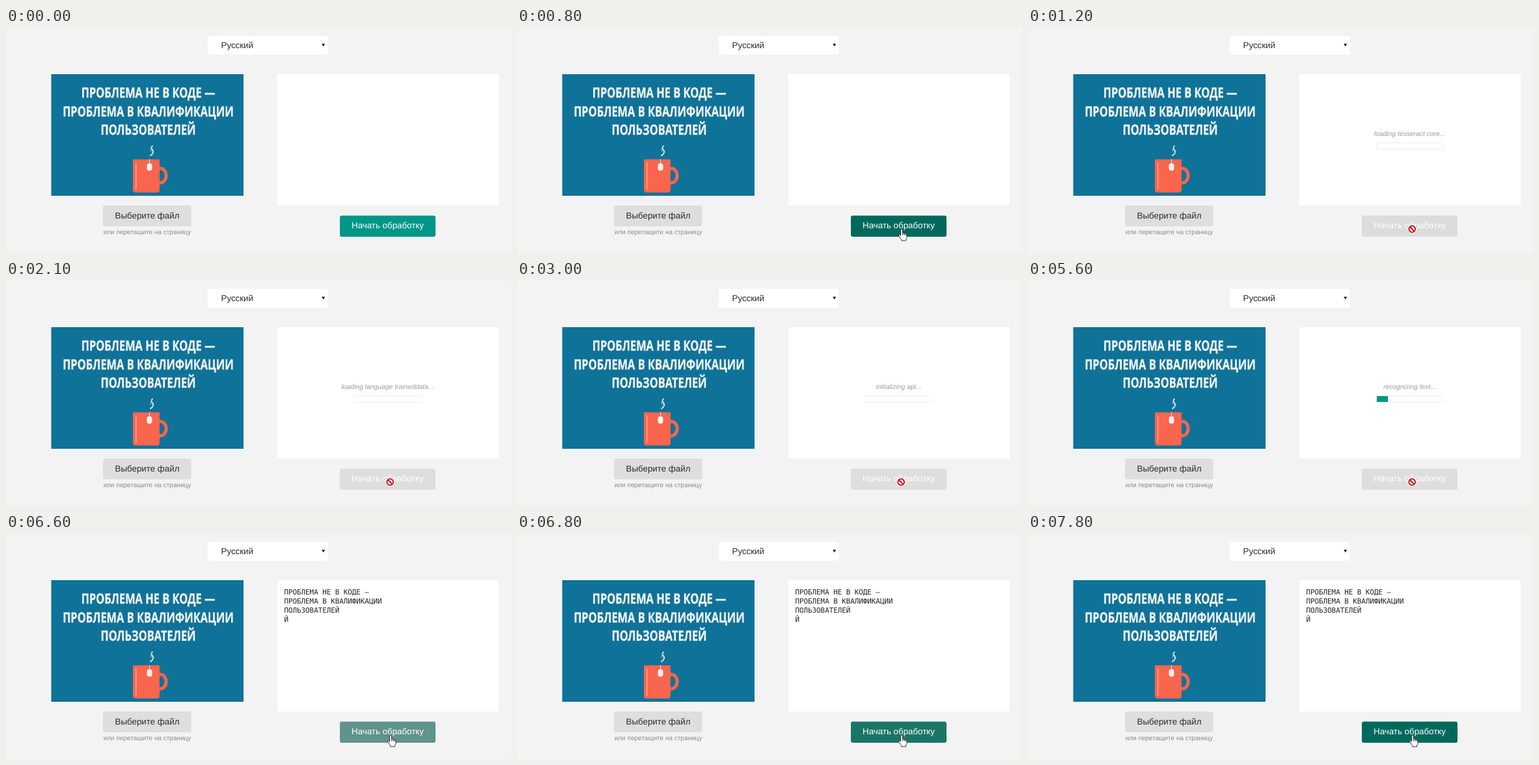
These frames come from a looping animation (776x346 px, 7900 ms). An HTML page:

```html
<!DOCTYPE html>
<html lang="ru">
<head>
<meta charset="utf-8">
<title>Распознавание текста</title>
<style>
  html, body { margin: 0; width: 100%; height: 100%; overflow: hidden; background: #f3f3f3; }
  svg { display: block; width: 776px; height: 346px; text-rendering: geometricPrecision; }
  text { font-family: "Liberation Sans", Arial, sans-serif; white-space: pre; }
  .ui { font-size: 13.33px; fill: #2b2b2b; }
  .hint { font-size: 10px; fill: #8a8a8a; }
  .mid { text-anchor: middle; }
  .poster { filter: blur(.4px); }
  .poster text {
    font: 700 21.6px "Open Sans", sans-serif; fill: #f4f6f5; text-anchor: middle;
    stroke: #f4f6f5; stroke-width: .35px;
  }
  .status { font-size: 10.35px; font-style: italic; fill: #999; }
  .out text { font: 10.83px "DejaVu Sans Mono", monospace; fill: #222; }
</style>
</head>
<body>
<svg viewBox="0 0 776 346">
  <rect width="776" height="346" fill="#f3f3f3"/>

  <rect x="310" y="12" width="184.500" height="29" rx="3" fill="#fff"/>
  <text class="ui" x="330.500" y="31">Русский</text>
  <path d="M485.200 24.200h5l-2.500 4.400z" fill="#111"/>

  <g class="poster">
    <rect x="69.500" y="71" width="295.500" height="187" fill="#0f7299"/>
    <g transform="translate(218.500 0) scale(.76 1)">
      <text y="107.300">ПРОБЛЕМА НЕ В КОДЕ —</text>
      <text y="135.800">ПРОБЛЕМА В КВАЛИФИКАЦИИ</text>
      <text y="164.300">ПОЛЬЗОВАТЕЛЕЙ</text>
    </g>
    <g fill="none" stroke-linecap="round">
      <path d="M236 216h1.500a8.600 11 0 0 1 0 22h-1.500" stroke="#f9654d" stroke-width="5"/>
      <path d="M195 202h41v47q0 4-4 4h-33q-4 0-4-4z" fill="#f9654d"/>
      <path d="M199.700 207v41" stroke="#fba793" stroke-width="1.500"/>
      <path d="M220.500 202v7" stroke="#f3e4dd" stroke-width="1"/>
      <rect x="216.500" y="208" width="8" height="11.500" rx="3.800" fill="#f6f1ee"/>
      <path d="M225 181.500c-5 4 3 6 1 10q-1 3-4 4.500" stroke="#d5e0e2" stroke-width="2"/>
      <path d="M222.500 186q-1.500 2 .5 4" stroke="#a9c4cd" stroke-width="1"/>
    </g>
  </g>

  <rect x="149" y="273" width="135.500" height="32" rx="3" fill="#dedede"/>
  <text class="ui mid" x="217" y="293">Выберите файл</text>
  <text class="hint mid" x="217" y="317">или перетащите на страницу</text>

  <rect x="417" y="71" width="340" height="202" fill="#fff"/>
  <g id="job">
    <text id="status" class="status mid" x="586.500" y="166"></text>
    <rect x="535.500" y="176.500" width="103" height="10" rx="1" fill="#fff" stroke="#f0efec"/>
    <rect id="fill" x="536" y="177" width="0" height="9" fill="#009688"/>
  </g>
  <g id="out" class="out">
    <text x="427.500" y="93">ПРОБЛЕМА НЕ В КОДЕ —</text>
    <text x="427.500" y="107">ПРОБЛЕМА В КВАЛИФИКАЦИИ</text>
    <text x="427.500" y="121">ПОЛЬЗОВАТЕЛЕЙ</text>
    <text x="427.500" y="135">Й</text>
  </g>

  <rect id="start" x="513" y="288.500" width="147" height="32.500" rx="3"/>
  <text class="ui mid" x="586.500" y="308" style="fill:#fff">Начать обработку</text>

  <g id="cursor">
    <path id="arrow" d="M0 0v13.500l3.100-2.900 2.200 5 2.100-1-2.100-4.800h4.200z" fill="#fff" stroke="#222" stroke-width=".9"/>
    <path id="hand" d="M-1.500 1.500Q-1.300 0 0 0T1.500 1.500V6.500Q3 5.500 3.900 7 5.300 6.200 6.100 7.800 8 7.300 8 9.300V12.500Q8 14.500 6.600 16V18H-.3V16.200Q-2 14.500-3 12.300L-4.700 10Q-5 8.300-3.300 8.500L-1.500 10.200ZM1.500 6.500V9.500M3.900 7V9.800M6.100 7.800V10" fill="#fff" stroke="#222" stroke-width=".9" stroke-linejoin="round"/>
    <g id="stop" transform="translate(-.8 .2)" fill="none">
      <circle r="5" fill="#f3e6e6" stroke="#fff" stroke-width="3.500"/>
      <circle r="4.900" stroke="#c90d1b" stroke-width="1.900"/>
      <path d="M-3.400-3.400L3.400 3.400" stroke="#c90d1b" stroke-width="1.900"/>
    </g>
  </g>
</svg>
<script>
const LOOP = 7900, STEP = 100;
const $ = id => document.getElementById(id);

// Tables of [time, ...values]; hold() jumps, mix() interpolates.
const statuses = [
  [0, ''],
  [900, 'loading tesseract core...'],
  [1500, 'loading language traineddata...'],
  [2500, 'initializing api...'],
  [4300, 'recognizing text...'],
  [6500, '']
];
const cursors = [[0, ''], [100, 'arrow'], [700, 'hand'], [1000, 'stop'], [6500, 'hand']];
const path = [[100, 574, 321], [400, 590, 321], [600, 590, 319], [800, 591, 309]];
const progress = [[4700, 0], [5200, 17], [5900, 17], [6100, 38]];
const colors = [
  [600, 0, 150, 136], [800, 0, 105, 92], [900, 0, 105, 92],
  [1100, 196, 208, 207], [1200, 220, 220, 222], [1500, 222, 222, 222],
  [6400, 222, 222, 222], [6600, 95, 147, 139], [6800, 26, 117, 104], [7100, 0, 105, 92]
];

function hold(table, t) {
  return table.filter(row => row[0] <= t).pop()[1];
}

function mix(table, t) {
  const i = table.findIndex(row => row[0] > t);
  if (i < 0) return table[table.length - 1].slice(1);
  if (i === 0) return table[0].slice(1);
  const [a, b] = [table[i - 1], table[i]];
  const k = (t - a[0]) / (b[0] - a[0]);
  return a.slice(1).map((v, n) => v + (b[n + 1] - v) * k);
}

function show(id, on) {
  $(id).style.display = on ? '' : 'none';
}

function draw(t) {
  const status = hold(statuses, t);
  show('job', status);
  $('status').textContent = status;
  $('fill').setAttribute('width', mix(progress, t)[0]);
  show('out', t >= 6500);
  $('start').setAttribute('fill', `rgb(${mix(colors, t).map(Math.round)})`);

  const kind = hold(cursors, t);
  for (const id of ['arrow', 'hand', 'stop']) show(id, id === kind);
  $('cursor').setAttribute('transform', `translate(${mix(path, t)})`);
}

const begin = performance.now();
function tick() {
  const t = (performance.now() - begin) % LOOP;
  draw(Math.floor(t / STEP) * STEP);
  requestAnimationFrame(tick);
}
draw(0);
requestAnimationFrame(tick);
</script>
</body>
</html>
```
